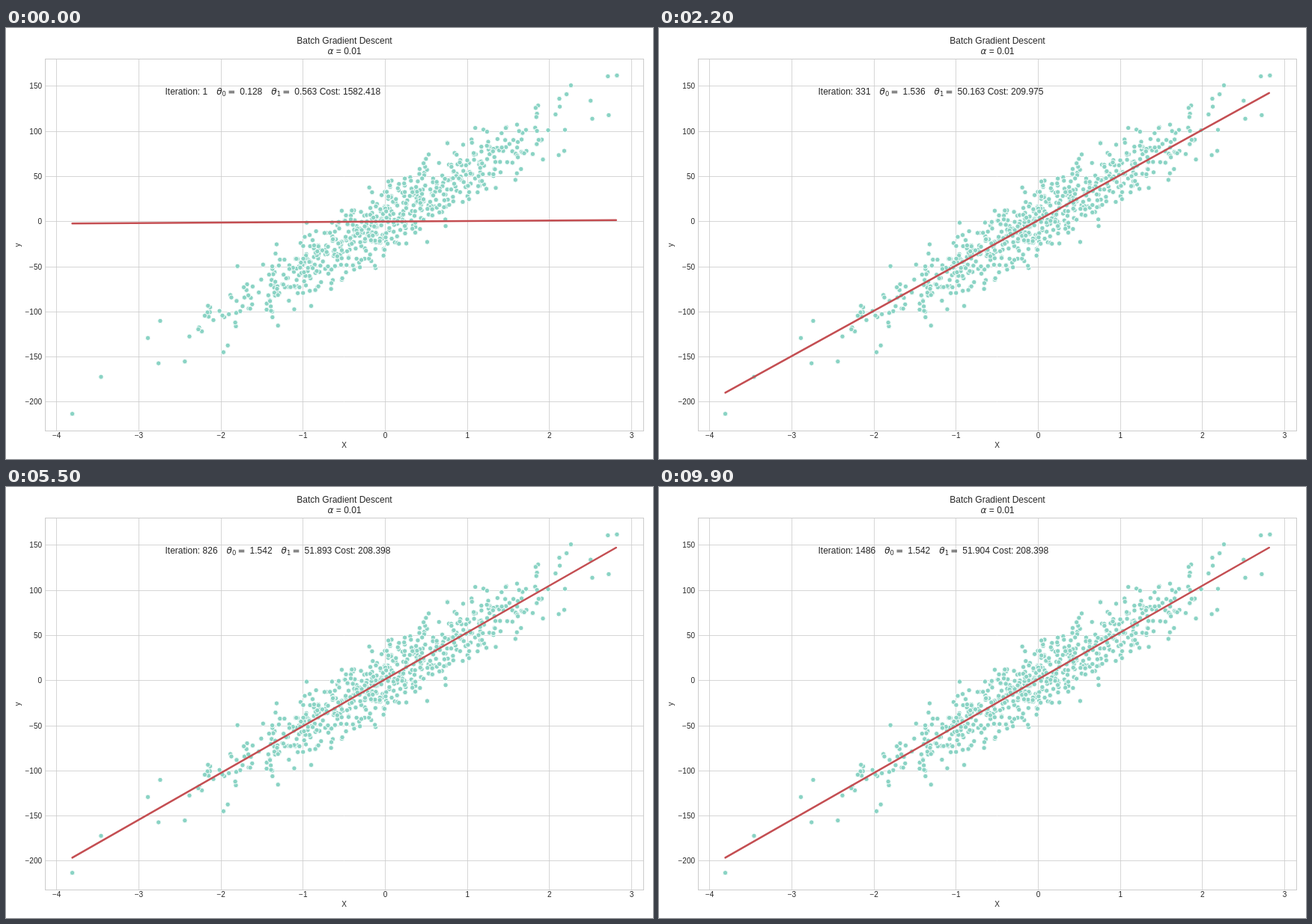
These frames come from a looping animation (864 by 576 pixels, 10000 ms). An HTML page with a canvas:

```html
<!DOCTYPE html>
<html lang="en">
<head>
<meta charset="utf-8">
<title>Batch Gradient Descent</title>
<style>
html, body { margin: 0; width: 100%; height: 100%; overflow: hidden; background: #fff; }
canvas { display: block; }
</style>
</head>
<body>
<canvas id="stage" width="864" height="576"></canvas>
<script>
const ctx = document.getElementById('stage').getContext('2d');
const SANS = '"Liberation Sans", Arial, sans-serif';
const MATH = '"DejaVu Sans", sans-serif';
const INK = '#262626';
const BEST = { t0: 1.542, t1: 51.9037, cost: 208.398 };
const px = x => 506.5 + 109.7 * x;
const py = y => 258.75 - 1.206 * y;

let seed = 20;
function random() {
  seed = (seed * 1664525 + 1013904223) % 4294967296;
  return (seed + 0.5) / 4294967296;
}
const normal = () => Math.sqrt(-2 * Math.log(random())) * Math.cos(2 * Math.PI * random());

// A few far points fix the ends of the cloud; noise around the best fit fills it
const points = [
  [2.82, 162], [2.71, 161], [2.26, 151], [2.72, 118], [2.5, 134], [2.52, 114],
  [-3.81, -213], [-3.46, -172], [-2.89, -129], [-2.76, -157], [-2.44, -155], [-2.74, -110]
];
while (points.length < 690) {
  const x = normal(), noise = 20.4 * normal();
  if (Math.abs(x) < 2.4 && Math.abs(noise) < 52) points.push([x, BEST.t0 + BEST.t1 * x + noise]);
}

// Gradient descent, written as the distance (a, b) from the best fit
function descend(iterations) {
  const rate = 0.01, mean = 0.0076, square = 1.020217;
  let a = 1.4323, b = 51.8697, cost;
  for (let i = 0; i < iterations; i++) {
    cost = BEST.cost + (a * a + square * b * b) / 2 + mean * a * b;
    [a, b] = [a - rate * (a + mean * b), b - rate * (mean * a + square * b)];
  }
  return { t0: BEST.t0 - a, t1: BEST.t1 - b, cost };
}

function text(str, x, y, size = 10, align = 'left', font = SANS, style = '') {
  ctx.font = `${style} ${size}px ${font}`;
  ctx.textAlign = align;
  ctx.fillStyle = INK;
  ctx.fillText(str, x, y);
  return x + ctx.measureText(str).width;
}

function segment(x1, y1, x2, y2) {
  ctx.beginPath();
  ctx.moveTo(x1, y1);
  ctx.lineTo(x2, y2);
  ctx.stroke();
}

function pen(color, width, cap = 'butt') {
  ctx.strokeStyle = color;
  ctx.lineWidth = width;
  ctx.lineCap = cap;
}

const snap = v => Math.floor(v) + 0.5;
const label = v => String(v).replace('-', '\u2212');

function drawAxes() {
  pen('#ccc', 0.8);
  for (let v = -4; v <= 3; v++) {
    segment(snap(px(v)), 41, snap(px(v)), 538);
    text(label(v), px(v), 548, 10, 'center');
  }
  for (let v = -200; v <= 150; v += 50) {
    segment(52, snap(py(v)), 851, snap(py(v)));
    text(label(v), 48, py(v) + 3.5, 10, 'right');
  }
  text('X', 451.5, 561, 10, 'center');
  ctx.save();
  ctx.translate(18.5, 290);
  ctx.rotate(-Math.PI / 2);
  text('y', 0, 0, 10, 'center');
  ctx.restore();
  text('Batch Gradient Descent', 452, 21, 12, 'center');
  text('α', 429.6, 35, 12, 'left', MATH, 'italic');
  text(' = 0.01', 437.5, 35, 12);
}

function drawPoints() {
  pen('#fff', 0.9);
  ctx.fillStyle = '#8ad3c4';
  for (const [x, y] of points) {
    ctx.beginPath();
    ctx.arc(px(x), py(y), 3.2, 0, 2 * Math.PI);
    ctx.fill();
    ctx.stroke();
  }
}

function theta(index, value, x) {
  text('θ', x, 89, 12, 'left', MATH, 'italic');
  text(index, x + 7.4, 91.3, 8.4, 'left', MATH);
  text('=', x + 15, 89, 12, 'left', MATH);
  return text(value.toFixed(3), x + 31, 89, 12);
}

function draw(step) {
  const n = 1 + 15 * step;
  const { t0, t1, cost } = descend(n);
  ctx.fillStyle = '#fff';
  ctx.fillRect(0, 0, 864, 576);
  drawAxes();
  drawPoints();

  pen('#c44e52', 2.5, 'round');
  const fit = x => py(t0 + t1 * x);
  segment(px(-3.81), fit(-3.81), px(2.81), fit(2.81));

  pen('#ccc', 1);
  ctx.strokeRect(52.5, 41.5, 799, 497);

  let x = text('Iteration: ' + n, 212.5, 89, 12);
  x = theta('0', t0, x + 12);
  x = theta('1', t1, x + 12);
  text('Cost: ' + cost.toFixed(3), x + 3.4, 89, 12);
}

const start = performance.now();
let shown = -1;
function tick() {
  const step = Math.floor((performance.now() - start) / 100) % 100;
  if (step !== shown) draw(shown = step);
  requestAnimationFrame(tick);
}
tick();
</script>
</body>
</html>
```
